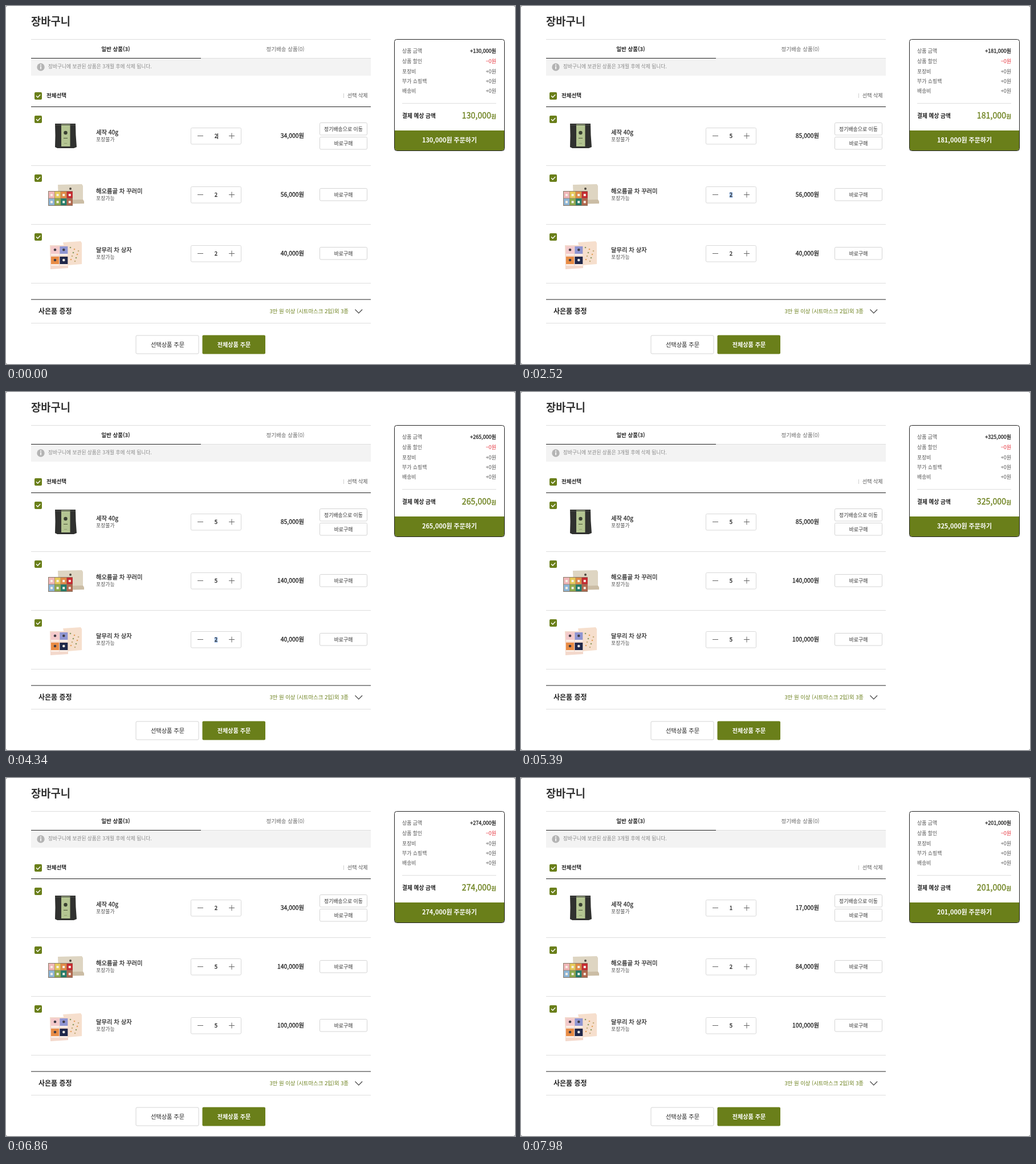
Recreate the animation shown at these times as an HTML page. Size 893 by 627 pixels, loop 8000 ms.

```html
<!DOCTYPE html>
<html lang="ko">
<head>
<meta charset="utf-8">
<title>장바구니</title>
<style>
  html, body { margin: 0; width: 100%; height: 100%; overflow: hidden; background: #888; }
  svg { display: block; width: 893px; height: 627px; font-family: "Noto Sans CJK KR", "Noto Sans CJK", "Noto Sans", sans-serif; }
  .medium { stroke: currentColor; stroke-width: .3px; }
  .bold { font-weight: 700; }
</style>
</head>
<body>
<svg id="stage" viewBox="0 0 893 627"></svg>
<script>
const OLIVE = '#6a7f1a', DARK = '#222', GRAY = '#555', PALE = '#dedede';
const ROW_HEIGHT = 103;
const UNIT_PRICES = [17000, 28000, 20000];

// Text is placed by its vertical centre.
function text(x, cy, size, content, { color = DARK, cls = '', anchor = 'start', id = '' } = {}) {
  return `<text id="${id}" x="${x}" y="${cy + size * .37}" font-size="${size}" class="${cls}"
    style="color:${color}" fill="${color}" text-anchor="${anchor}">${content}</text>`;
}
const rect = (x, y, w, h, fill, rx = 0, stroke = 'none') =>
  `<rect x="${x}" y="${y}" width="${w}" height="${h}" fill="${fill}" rx="${rx}" stroke="${stroke}"/>`;
const path = (d, stroke, width = 1, fill = 'none') =>
  `<path d="${d}" stroke="${stroke}" stroke-width="${width}" fill="${fill}"/>`;
const rule = (x1, x2, y, color = PALE) => path(`M${x1} ${y}H${x2}`, color);
const dot = (x, y, r, fill) => `<circle cx="${x}" cy="${y}" r="${r}" fill="${fill}"/>`;
const checkbox = y => rect(50, y, 13, 13, OLIVE, 2) + path(`M53 ${y + 6.2}l2.7 2.8 4.5-4.8`, '#fff', 1.4);
const button = (y, label) => rect(550.5, y, 83, 21.5, '#fff', 2, '#d4d4d4') +
  text(592, y + 10.8, 8.9, label, { color: '#333', anchor: 'middle' });

function pouch() {
  return path('M86 206h36q0 20 2 41l-5 2H90l-4-2q1-20 0-41z', 'none', 0, '#30312f') +
    rect(97, 207, 15.5, 39, '#b4c592') + rule(86, 122, 208.5, '#484a46') +
    dot(104.5, 222, 3.2, '#3a4132') + rule(101, 108, 231.5, '#4b5538') + rule(102, 107, 240.5, '#8d9d70');
}

function teaCollection() {
  const colors = ['#efb6b8', '#e6c95a', '#df8a48', '#c52b30', '#8db5d6', '#8dab4d', '#227b68', '#b0664c'];
  const packs = colors.map((color, i) => {
    const x = 75 + i % 4 * 10.6, y = 325 + (i >> 2) * 12.3;
    return rect(x, y, 10, 11.5, color) + rect(x + 3, y + 4, 4, 4, '#f5eee5');
  });
  return path('M91 313l42-1 2 3v25l-43 1z', 'none', 0, '#ded5c2') +
    path('M93 340l42-1 2 3v4l-43 1z', 'none', 0, '#cbbda5') +
    dot(113, 320, 2, '#4c483f') +
    rect(74, 324, 43, 26, '#8b7a68') + packs.join('');
}

function teaBox() {
  const colors = ['#f3c9cb', '#8f95d2', '#e88c45', '#20284a'];
  const packs = colors.map((color, i) => {
    const x = 79 + i % 2 * 15.3, y = 421 + (i >> 1) * 18;
    return rect(x, y, 14, 13, color) + dot(x + 7, y + 6, 2.3, i == 3 ? '#e9e4df' : '#403c46') +
      rect(x, y + 13, 14, 3, '#fbeee6');
  });
  let sprigs = '';
  for (let i = 0; i < 9; i++) {
    const x = 113 + i * 7 % 16, y = 423 + i * 3;
    sprigs += dot(x, y, 1.3, ['#8b9a62', '#e4a05c', '#c6ad7b'][i % 3]);
  }
  return path('M100 414l31-2 2 3v37l-24 2z', 'none', 0, '#f6dfcd') + sprigs +
    path('M77 419h32v40l-31 2z', 'none', 0, '#f3d8cb') + packs.join('');
}

function productRow(i, name, note) {
  const y = i * ROW_HEIGHT, cy = y + 227.5;
  return checkbox(y + 192) +
    text(158, y + 221, 10.3, name, { color: '#333', cls: 'medium' }) +
    text(158, y + 234, 8.9, note, { color: GRAY }) +
    rect(324.5, y + 213.5, 88, 28.5, '#fff', 2, '#d8d8d8') +
    rule(336, 346, y + 227.5, '#666') +
    path(`M391 ${y + 227.5}h10m-5 -5v10`, '#666') +
    `<rect id="select${i}" x="365.7" y="${y + 223}" width="5.6" height="10" fill="#a9c9f4"/>` +
    text(368.4, cy, 9.5, '', { cls: 'medium', anchor: 'middle', id: 'quantity' + i }) +
    `<rect id="caret${i}" x="371" y="${y + 223}" width="1" height="10" fill="#222"/>` +
    text(523, cy, 10.4, '', { cls: 'medium', anchor: 'end', id: 'price' + i }) +
    (i ? button(y + 216.5, '바로구매') : button(204.5, '정기배송으로 이동') + button(229.5, '바로구매')) +
    rule(44, 640, y + 279.5);
}

function summaryLine(y, label, value, id, style = { color: GRAY }) {
  return text(695, y, 8.9, label, { color: GRAY }) +
    text(860, y, 9, value, { ...style, anchor: 'end', id });
}

const $ = id => document.getElementById(id);

$('stage').innerHTML = rect(0, 0, 893, 627, '#fff', 3) +
  text(44, 27, 18.75, '장바구니', { color: '#333', cls: 'bold' }) +
  rule(44, 640, 58.5) +
  text(192.5, 75, 9.5, '일반 상품(3)', { cls: 'bold', anchor: 'middle' }) +
  text(490, 75, 9.5, '정기배송 상품(0)', { color: '#666', anchor: 'middle' }) +
  rect(44, 92, 596, 30, '#f3f3f3') + rule(342, 640, 91.5) + rule(44, 342, 91.5, DARK) +
  dot(61, 107, 6.7, '#b4b4b4') + rect(60.2, 105.5, 1.7, 5, '#fff') + dot(61, 103.4, 1.1, '#fff') +
  text(74, 106, 8.7, '장바구니에 보관된 상품은 3개월 후에 삭제 됩니다.', { color: '#888' }) +
  checkbox(151) +
  text(71, 156.5, 9.5, '전체선택', { cls: 'bold' }) +
  path('M592.5 153v8', '#d0d0d0') +
  text(599, 156.5, 9, '선택 삭제', { color: GRAY }) +
  rule(44, 640, 176.5, DARK) +
  productRow(0, '세작 40g', '포장불가') + pouch() +
  productRow(1, '해오름골 차 꾸러미', '포장가능') + teaCollection() +
  productRow(2, '달무리 차 상자', '포장가능') + teaBox() +
  rule(44, 640, 514, DARK) +
  text(57, 534.5, 12, '사은품 증정', { cls: 'bold' }) +
  text(601, 534.5, 9.4, '3만 원 이상 (시트마스크 2입)외 3종', { color: OLIVE, anchor: 'end' }) +
  path('M612.5 531.5l6.3 6.5 6.3-6.5', '#444', 1.2) +
  rule(44, 640, 555.5) +
  rect(228, 577, 110, 32, '#fff', 2, '#d4d4d4') +
  text(283.5, 593.5, 10.2, '선택상품 주문', { anchor: 'middle' }) +
  rect(344.5, 576.5, 110.5, 33, OLIVE, 2) +
  text(400, 593.5, 10.1, '전체상품 주문', { color: '#fff', cls: 'bold', anchor: 'middle' }) +
  path('M682 218H874V249q0 4-4 4H686q-4 0-4-4z', 'none', 0, OLIVE) +
  rect(681.5, 58.5, 193, 195, 'none', 4, DARK) +
  summaryLine(79, '상품 금액', '', 'amount', { cls: 'medium' }) +
  summaryLine(97, '상품 할인', '−0원', '', { color: '#e5323c' }) +
  summaryLine(114.5, '포장비', '+0원') +
  summaryLine(131.5, '부가 쇼핑백', '+0원') +
  summaryLine(148.5, '배송비', '+0원') +
  rule(695, 860, 170.5) +
  text(695, 192.5, 9.7, '결제 예상 금액', { cls: 'bold' }) +
  text(851, 192, 14.2, '', { color: OLIVE, cls: 'medium', anchor: 'end', id: 'total' }) +
  text(860, 193.5, 9.6, '원', { color: OLIVE, cls: 'bold', anchor: 'end' }) +
  text(778, 235, 11, '', { color: '#fff', cls: 'bold', anchor: 'middle', id: 'order' });

// Typed quantities, the quantities already priced, and the active caret or selection.
const STEPS = [
  [0, { quantity: '222', priced: '222', mark: 'caret0' }],
  [210, { mark: 'select0' }],
  [1260, { quantity: '522', mark: 'caret0' }],
  [1680, { priced: '522' }],
  [1750, { mark: '' }],
  [2310, { mark: 'caret0' }],
  [2380, { mark: 'caret1' }],
  [2520, { mark: 'select1' }],
  [3150, { quantity: '552', mark: 'caret1' }],
  [3360, { priced: '552' }],
  [3640, { mark: '' }],
  [4130, { mark: 'caret2' }],
  [4340, { mark: 'select2' }],
  [4830, { quantity: '555', mark: 'caret2' }],
  [5040, { priced: '555' }],
  [5390, { mark: '' }],
  [5880, { mark: 'caret2' }],
  [6160, { quantity: '455', mark: '' }],
  [6510, { priced: '455' }],
  [6580, { quantity: '355' }],
  [6650, { priced: '355' }],
  [6720, { quantity: '255' }],
  [6860, { priced: '255' }],
  [6930, { quantity: '155' }],
  [7000, { priced: '155' }],
  [7560, { quantity: '145' }],
  [7700, { quantity: '135', priced: '145' }],
  [7840, { quantity: '125' }],
  [7980, { priced: '135' }],
];
const LOOP = 8000;
const money = value => value.toLocaleString('en-US');

function render(time) {
  const state = {};
  for (const [start, change] of STEPS) if (time >= start) Object.assign(state, change);
  let sum = 0;
  UNIT_PRICES.forEach((unit, i) => {
    const price = unit * state.priced[i];
    sum += price;
    $('quantity' + i).textContent = state.quantity[i];
    $('price' + i).textContent = money(price) + '원';
    for (const kind of ['caret', 'select'])
      $(kind + i).style.display = state.mark === kind + i ? '' : 'none';
  });
  $('amount').textContent = `+${money(sum)}원`;
  $('total').textContent = money(sum);
  $('order').textContent = `${money(sum)}원 주문하기`;
}

function tick() {
  render(performance.now() % LOOP);
  requestAnimationFrame(tick);
}
tick();
</script>
</body>
</html>
```
